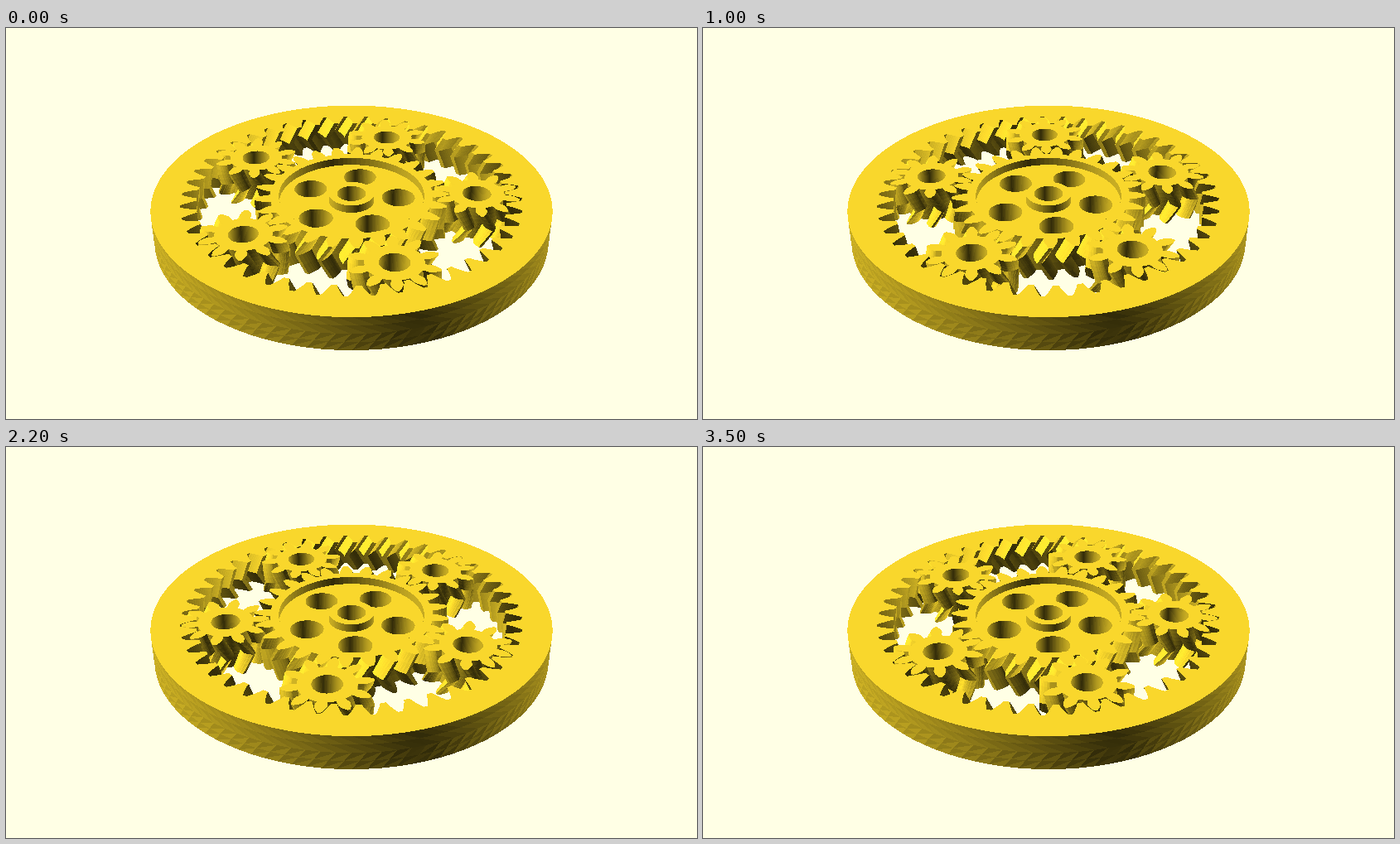
An HTML page with a canvas that plays this animation: 834 by 472 pixels, repeating every 3600 ms.

```html
<!DOCTYPE html>
<html lang="en">
<head>
<meta charset="utf-8">
<title>Planetary gear</title>
<style>
  html, body { margin: 0; width: 834px; height: 472px; overflow: hidden; background: #ffffe5; }
  canvas { display: block; }
</style>
</head>
<body>
<canvas id="stage" width="834" height="472"></canvas>
<script>
const W = 834, H = 472, STEP = 100, STEPS = 36;
const TAU = 2 * Math.PI, DEG = Math.PI / 180;

// Gear data, in units of one module
const SUN = 25, PLANET = 10, RING = 45, PLANETS = 5;
const THICK = 5, MID = THICK / 2, BORE = 2, ORBIT = (SUN + PLANET) / 2;
const ROOT = 7 / 6;                       // tooth depth below the pitch circle
const PRESSURE = Math.atan(Math.tan(20 * DEG) / Math.cos(30 * DEG));
const SHIFT = MID * Math.tan(30 * DEG);   // helix travel over half the thickness

// Camera and light
const TILT = 33 * DEG, CT = Math.cos(TILT), ST = Math.sin(TILT);
const DIST = 140, FOCAL = H / 2 / Math.tan(11.25 * DEG);
const BASE = [249, 215, 44], BACK = 0xffe5ffff;

const polar = (r, a) => [r * Math.cos(a), r * Math.sin(a)];
const involute = a => Math.tan(a) - a;

function circle(r, n, cx = 0, cy = 0) {
  return Array.from({ length: n }, (_, i) => {
    const [x, y] = polar(r, TAU * i / n);
    return [x + cx, y + cy];
  });
}

// Counter-clockwise involute outline with a tooth centred on angle 0
function toothed(teeth, tip, root, width) {
  const r = teeth / 2, rb = r * Math.cos(PRESSURE), n = 8, valley = 4;
  const first = root > rb ? Math.acos(rb / root) : 0, last = Math.acos(rb / tip);
  const half = a => involute(PRESSURE) + 90 * width / teeth * DEG - involute(a);
  const pts = [], pitch = TAU / teeth, edge = half(first);
  for (let i = 0; i < teeth; i++) {
    const mid = i * pitch;
    pts.push(polar(root, mid - edge));
    for (const side of [-1, 1]) {
      for (let k = 0; k <= n; k++) {
        const a = first + (last - first) * (side < 0 ? k : n - k) / n;
        pts.push(polar(rb / Math.cos(a), mid + side * half(a)));
      }
    }
    for (let k = 0; k < valley; k++) {
      pts.push(polar(root, mid + edge + (pitch - 2 * edge) * k / valley));
    }
  }
  return pts;
}

const tri = (mesh, ...pts) => { for (const p of pts) mesh.push(p[0], p[1], p[2]); };

function eachEdge(pts, fn) {
  pts.forEach((p, i) => fn(p, pts[(i + 1) % pts.length]));
}

function wall(mesh, pts, z1, z2) {
  eachEdge(pts, (p, q) => {
    tri(mesh, [...p, z1], [...q, z1], [...q, z2]);
    tri(mesh, [...p, z1], [...q, z2], [...p, z2]);
  });
}

// Herringbone wall: straight at mid height, turned by twist at both ends
function twisted(mesh, pts, twist, slices) {
  const place = (p, s, dir) => {
    const a = twist * s / slices, c = Math.cos(a), d = Math.sin(a);
    return [p[0] * c - p[1] * d, p[0] * d + p[1] * c, MID + dir * MID * s / slices];
  };
  for (const dir of [-1, 1]) {
    for (let s = 0; s < slices; s++) {
      eachEdge(pts, (p, q) => {
        const p1 = place(p, s, dir), q1 = place(q, s, dir);
        const p2 = place(p, s + 1, dir), q2 = place(q, s + 1, dir);
        if (twist < 0) {
          tri(mesh, p1, q1, p2);
          tri(mesh, p2, q1, q2);
        } else {
          tri(mesh, p1, q1, q2);
          tri(mesh, p1, q2, p2);
        }
      });
    }
  }
}

// Flat face between an outline and a circle around (cx, cy)
function face(mesh, pts, r, z, cx = 0, cy = 0) {
  const project = p => {
    const k = r / Math.hypot(p[0] - cx, p[1] - cy);
    return [cx + (p[0] - cx) * k, cy + (p[1] - cy) * k, z];
  };
  eachEdge(pts, (p, q) => {
    const a = project(p), b = project(q);
    tri(mesh, [...p, z], [...q, z], b);
    tri(mesh, [...p, z], b, a);
  });
}

function turned(pts, a) {
  const c = Math.cos(a), s = Math.sin(a);
  return pts.map(([x, y]) => [x * c - y * s, x * s + y * c]);
}

function makeRing() {
  const mesh = [], root = RING / 2 + ROOT, rim = root + 4, twist = -SHIFT / (RING / 2);
  const teeth = toothed(RING, root, RING / 2 - 1, 1.05);
  twisted(mesh, teeth, twist, 2);
  twisted(mesh, circle(rim, 96), twist, 2);
  face(mesh, turned(teeth, twist), rim, THICK);
  return new Float64Array(mesh);
}

function makePlanet() {
  const mesh = [], r = PLANET / 2, twist = -SHIFT / r;
  const teeth = toothed(PLANET, r + 1, r - ROOT, 0.95);
  twisted(mesh, teeth, twist, 4);
  face(mesh, turned(teeth, twist), BORE, THICK);
  wall(mesh, circle(BORE, 96), 0, THICK);
  return new Float64Array(mesh);
}

function makeSun() {
  const mesh = [], r = SUN / 2, twist = SHIFT / r, holes = 5;
  const hole = (r - ROOT - BORE) / 4, holeOrbit = BORE + 2 * hole;
  const hub = BORE + hole / 2, recess = holeOrbit + 1.49 * hole, web = THICK - hole / 2;
  const teeth = toothed(SUN, r + 1, r - ROOT, 0.95);
  twisted(mesh, teeth, twist, 2);
  face(mesh, turned(teeth, twist), recess, THICK);
  wall(mesh, circle(recess, 96), 0, THICK);
  wall(mesh, circle(hub, 96), 0, THICK);
  wall(mesh, circle(BORE, 96), 0, THICK);
  face(mesh, circle(hub, 96), BORE, THICK);

  const n = 16, half = Math.PI / holes;
  for (let i = 0; i < holes; i++) {
    const a = TAU * i / holes, [cx, cy] = polar(holeOrbit, a), cell = [];
    const side = (from, to) => {
      for (let k = 0; k < n; k++) {
        const u = k / n;
        cell.push(polar(from[0] + (to[0] - from[0]) * u, a + from[1] + (to[1] - from[1]) * u));
      }
    };
    const corners = [[recess, -half], [recess, half], [hub, half], [hub, -half]];
    eachEdge(corners, side);
    face(mesh, cell, hole, web, cx, cy);
    wall(mesh, circle(hole, 96, cx, cy), 0, web);
  }
  return new Float64Array(mesh);
}

const ctx = document.getElementById("stage").getContext("2d");
const image = ctx.createImageData(W, H);
const pixels = new Uint32Array(image.data.buffer);
const depth = new Float32Array(W * H);

function shade(light) {
  const [r, g, b] = BASE.map(v => Math.min(255, Math.round(v * light)));
  return (255 << 24 | b << 16 | g << 8 | r) >>> 0;
}

function fill(ax, ay, aw, bx, by, bw, cx, cy, cw, color) {
  const area = (bx - ax) * (cy - ay) - (by - ay) * (cx - ax);
  if (Math.abs(area) < 1e-9) return;
  const x0 = Math.max(0, Math.ceil(Math.min(ax, bx, cx) - 0.5));
  const x1 = Math.min(W - 1, Math.floor(Math.max(ax, bx, cx) - 0.5));
  const y0 = Math.max(0, Math.ceil(Math.min(ay, by, cy) - 0.5));
  const y1 = Math.min(H - 1, Math.floor(Math.max(ay, by, cy) - 0.5));
  const ux = (cy - ay) / area, uy = (ax - cx) / area;
  const vx = (ay - by) / area, vy = (bx - ax) / area;
  for (let y = y0; y <= y1; y++) {
    const dy = y + 0.5 - ay;
    for (let x = x0; x <= x1; x++) {
      const dx = x + 0.5 - ax;
      const u = dx * ux + dy * uy, v = dx * vx + dy * vy;
      if (u < 0 || v < 0 || u + v > 1) continue;
      const w = aw + u * (bw - aw) + v * (cw - aw), i = y * W + x;
      if (w > depth[i]) {
        depth[i] = w;
        pixels[i] = color;
      }
    }
  }
}

const eye = new Float64Array(9), screen = new Float64Array(9);

function draw(mesh, angle = 0, tx = 0, ty = 0) {
  const c = Math.cos(angle), s = Math.sin(angle);
  for (let i = 0; i < mesh.length; i += 9) {
    for (let k = 0; k < 9; k += 3) {
      const mx = mesh[i + k], my = mesh[i + k + 1], z = mesh[i + k + 2];
      const x = mx * c - my * s + tx, y = mx * s + my * c + ty;
      const away = y * CT - z * ST, up = y * ST + z * CT, w = 1 / (DIST + away);
      eye[k] = x; eye[k + 1] = away; eye[k + 2] = up;
      screen[k] = W / 2 + FOCAL * x * w;
      screen[k + 1] = H / 2 - FOCAL * up * w;
      screen[k + 2] = w;
    }
    const ax = eye[3] - eye[0], ay = eye[4] - eye[1], az = eye[5] - eye[2];
    const bx = eye[6] - eye[0], by = eye[7] - eye[1], bz = eye[8] - eye[2];
    const nx = ay * bz - az * by, ny = az * bx - ax * bz, nz = ax * by - ay * bx;
    const len = Math.hypot(nx, ny, nz);
    if (len < 1e-12) continue;
    // Two opposite lights plus ambient
    const light = 0.2 + Math.abs(nz - nx - ny) / (len * Math.sqrt(3));
    fill(...screen, shade(light));
  }
}

const planet = makePlanet(), sun = makeSun();

pixels.fill(BACK);
draw(makeRing());
const ringPixels = pixels.slice(), ringDepth = depth.slice();

function render(step) {
  const carrier = step * TAU / PLANETS / STEPS;
  pixels.set(ringPixels);
  depth.set(ringDepth);
  draw(sun, Math.PI / SUN + carrier * (1 + RING / SUN));
  for (let i = 0; i < PLANETS; i++) {
    const a = carrier + TAU * i / PLANETS;
    draw(planet, a * (1 - RING / PLANET), ...polar(ORBIT, a));
  }
  ctx.putImageData(image, 0, 0);
}

const start = performance.now();
let shown = -1;

function tick() {
  const step = Math.floor((performance.now() - start) / STEP) % STEPS;
  if (step !== shown) render(shown = step);
  requestAnimationFrame(tick);
}
tick();
</script>
</body>
</html>
```
